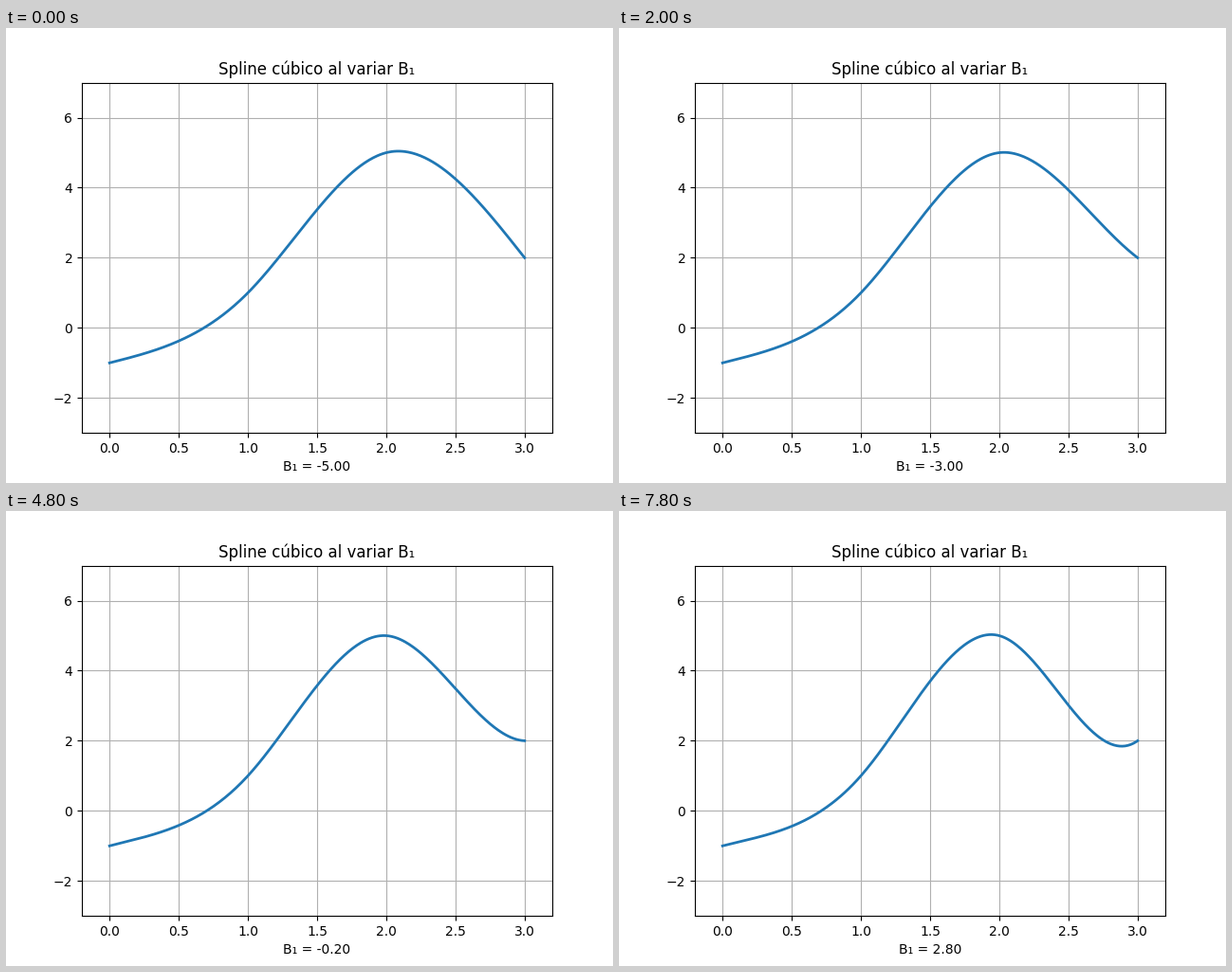
Animation of 640x480 px, one loop 8000 ms. Source, as a matplotlib script:

```python
import numpy as np
import matplotlib.pyplot as plt
from matplotlib.animation import FuncAnimation

FRAMES = 40
INTERVAL = 200
KNOTS = np.array([-1.0, 1.0, 5.0, 2.0])  # values at x = 0, 1, 2, 3
START_SLOPE = 1.0

x = np.linspace(0, 3, 300)


def clamped_spline(end_slope):
    """Cubic spline through KNOTS with both end slopes fixed."""
    rhs = 3 * (KNOTS[2:] - KNOTS[:-2]) - [START_SLOPE, end_slope]
    inner = np.linalg.solve([[4, 1], [1, 4]], rhs)
    m = np.array([START_SLOPE, *inner, end_slope])
    i = np.minimum(x.astype(int), 2)
    t = x - i
    return ((1 + 2 * t) * (1 - t) ** 2 * KNOTS[i]
            + t * (1 - t) ** 2 * m[i]
            + t ** 2 * (3 - 2 * t) * KNOTS[i + 1]
            + t ** 2 * (t - 1) * m[i + 1])


fig, ax = plt.subplots(figsize=(6.4, 4.8), dpi=100)
line, = ax.plot([], [], lw=2)
ax.set_xlim(-0.2, 3.2)
ax.set_ylim(-3, 7)
ax.set_title("Spline cúbico al variar B₁")
ax.grid(True)


def update(k):
    b1 = -5 + 0.2 * k
    line.set_data(x, clamped_spline(b1))
    ax.set_xlabel(f"B₁ = {b1:.2f}")
    return line,


anim = FuncAnimation(fig, update, frames=FRAMES, interval=INTERVAL,
                     repeat=True, repeat_delay=0)
plt.show()
```
